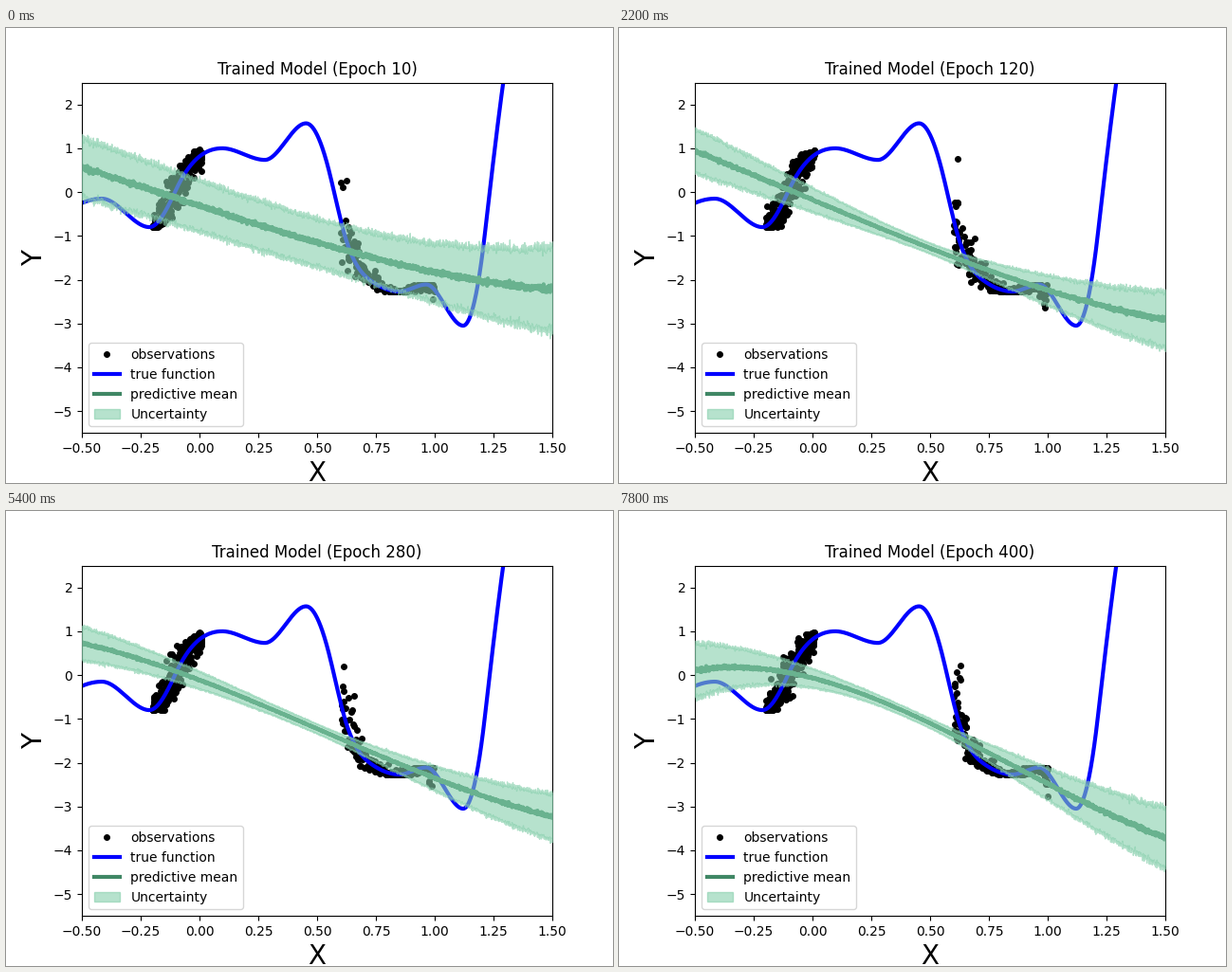
A matplotlib script for the animation above (8 s loop, 640 px wide and 480 px high).

```python
import numpy as np
import matplotlib.pyplot as plt
from matplotlib.animation import FuncAnimation

FRAMES, STEP_MS = 40, 200
GREEN, DARK_GREEN = "#86cfac", "#408765"
X = np.linspace(-.5, 1.5, 2000)
S = X - .5           # position relative to the pivot of the fit

# Turning points (slope 0) and a few steep points: x, y, slope.
CURVE = np.array([
    (-.5, -.25, 2.3), (-.415, -.15, 0), (-.213, -.8, 0), (-.1, .05, 11.5),
    (.097, 1, 0), (.278, .735, 0), (.453, 1.57, 0), (.55, .5, -21),
    (.63, -1.2, -15.5), (.73, -2.03, -3.8), (.85, -2.27, 0),
    (.964, -2.11, 0), (1.121, -3.05, 0), (1.214, -.92, 47), (1.33, 3.85, 30)])


def truth(x):
    """Cubic Hermite curve through the key points."""
    kx, ky, slope = CURVE.T
    i = np.clip(np.searchsorted(kx, x) - 1, 0, len(kx) - 2)
    h = kx[i + 1] - kx[i]
    t = (x - kx[i]) / h
    ease = t * t * (3 - 2 * t)
    return (ky[i] + (ky[i + 1] - ky[i]) * ease
            + h * t * (1 - t) * ((1 - t) * slope[i] - t * slope[i + 1]))


def observe(rng, count=260, noise=.025):
    x = np.hstack([rng.uniform(-.2, .01, count), rng.uniform(.6, 1, count)])
    return x, truth(x + noise * rng.standard_normal(x.size))


def fit(epoch):
    """Smooth mean and band half-width: quick settling, then a slow bend."""
    u = epoch / 400
    settle = np.exp(-(epoch - 10) / 30)
    z = (epoch - 10) / 10
    surge = z * np.exp(1 - z)

    mean = (-1.29 + .19 * u**3 + .14 * settle
            + (-2.08 - .5 * u**2 + .52 * settle) * S
            + (.32 - 1.02 * u**3) * S**2
            + (.17 + .5 * u**3) * S**3)

    waist = .11 + .44 * settle
    left = .67 - .55 * u - .25 * settle + .5 * u**5 * np.abs(S)
    right = .8 - .55 * u + .44 * u**4 + .3 * surge
    return mean, np.hypot(waist, np.where(S < 0, left, right) * S)


def predict(rng, epoch):
    """Sampled mean with the lower and upper edge of the band."""
    mean, half = fit(epoch)
    mean = mean + .04 * half * rng.standard_normal(X.size)
    half = half * (1 + .055 * rng.standard_normal(X.size))
    return mean, mean - half, mean + half


fig, ax = plt.subplots(figsize=(6.4, 4.8), dpi=100)
dots, = ax.plot([], [], "ko", markersize=4, label="observations")
x_true = np.linspace(-.5, 1.33, 1000)
ax.plot(x_true, truth(x_true), "b-", linewidth=3, label="true function")
mean_line, = ax.plot([], [], color=DARK_GREEN, linewidth=3,
                     label="predictive mean")
band = ax.fill_between(X, X, X, color=GREEN, alpha=.6, zorder=5,
                       label="Uncertainty")
ax.set_xlim(-.5, 1.5)
ax.set_ylim(-5.5, 2.5)
ax.set_xlabel("X", fontsize=20)
ax.set_ylabel("Y", fontsize=20)
title = ax.set_title("")
ax.legend(loc="lower left")


def update(frame):
    epoch = 10 * (frame + 1)
    rng = np.random.default_rng(frame)
    dots.set_data(*observe(rng))
    mean, low, high = predict(rng, epoch)
    mean_line.set_data(X, mean)
    band.set_verts([np.column_stack([np.hstack([X, X[::-1]]),
                                     np.hstack([low, high[::-1]])])])
    title.set_text(f"Trained Model (Epoch {epoch})")
    return dots, mean_line, band, title


anim = FuncAnimation(fig, update, frames=FRAMES, interval=STEP_MS,
                     repeat=True, repeat_delay=0)
plt.show()
```
